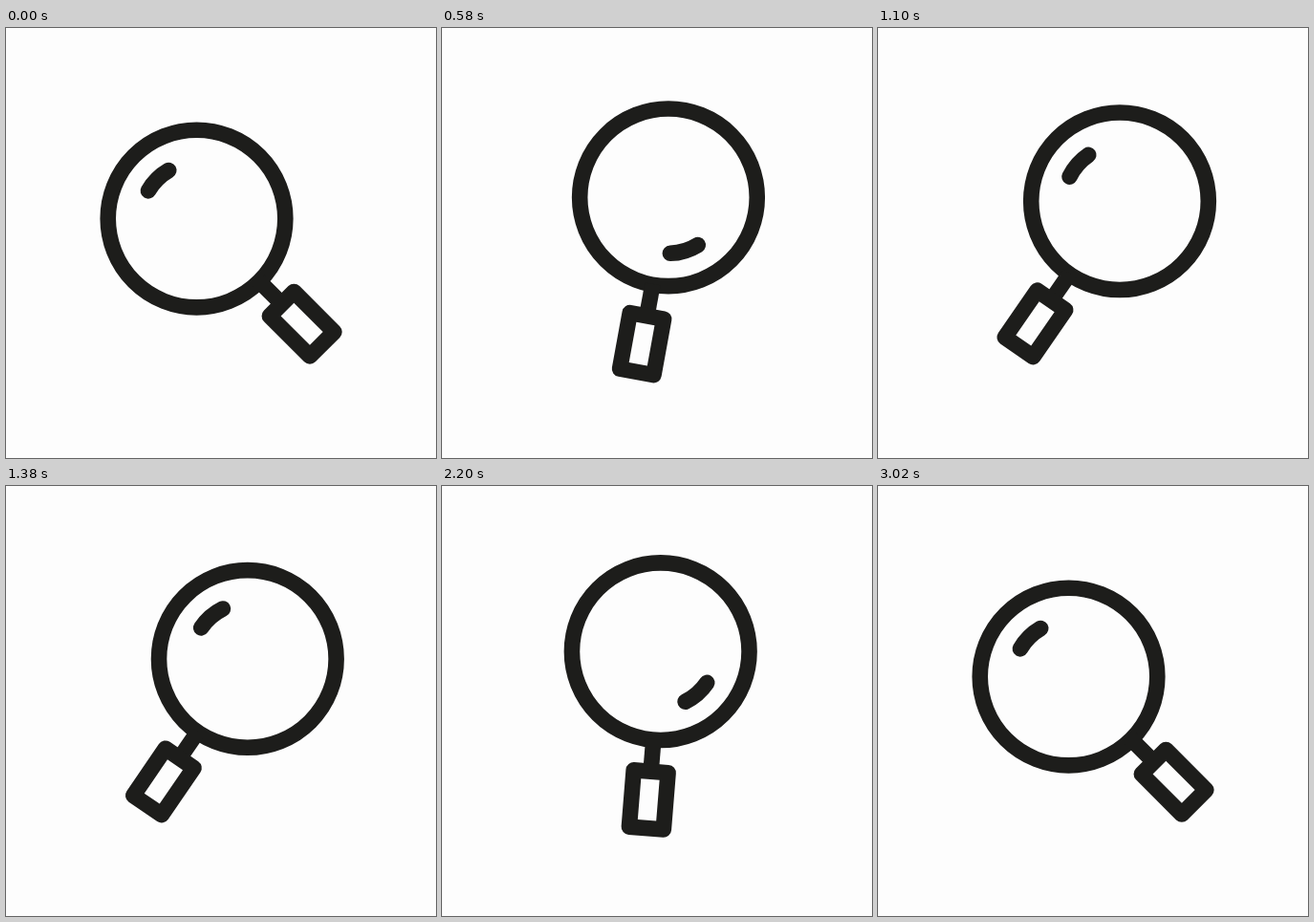
An HTML page for the animation above (3040 ms loop, 450 by 450 pixels).

```html
<!DOCTYPE html>
<html>
<head>
<meta charset="utf-8">
<style>
  html, body { margin: 0; width: 100%; height: 100%; overflow: hidden; background: #fdfdfd; }
  svg { display: block; width: 100%; height: 100%; }
</style>
</head>
<body>
<svg viewBox="0 0 450 450" fill="none" stroke="#1d1d1b" stroke-width="16.6" stroke-linejoin="round">
  <g id="glass">
    <circle r="92.8"/>
    <g id="handle">
      <path d="M92 0H126"/>
      <rect x="126" y="-18" width="59.5" height="36"/>
    </g>
    <path id="glint" d="M56.5 -15.1A58.5 58.5 0 0 1 56.5 15.1" stroke-linecap="round"/>
  </g>
</svg>
<script>
const LOOP = 3040, TURN = 1200, SWING = 80;
const [glass, handle, glint] = ['glass', 'handle', 'glint'].map(id => document.getElementById(id));

// cubic-bezier(a, 0, b, 1)
function ease(x, a, b) {
  let lo = 0, hi = 1;
  for (let i = 0; i < 30; i++) {
    const s = (lo + hi) / 2, r = 1 - s;
    if (3 * r * r * s * a + 3 * r * s * s * b + s ** 3 < x) lo = s; else hi = s;
  }
  return lo * lo * (3 - 2 * lo);
}

// Sideways drift that starts and ends at zero
const bow = (e, a, b) => 3 * (1 - e) * e * ((1 - e) * a + e * b);

function draw(t) {
  let swing, spin, dx, dy;
  if (t < TURN) {
    const x = t / TURN, e = ease(x, .476, .251);
    swing = SWING * e;
    spin = 360 * ease(x, .278, .545);
    dx = bow(e, 4.8, 3.2);
    dy = bow(e, 5.8, -5.1);
  } else {
    const x = (t - TURN) / (LOOP - TURN), e = ease(x, .672, .605);
    swing = SWING * (1 - e);
    spin = 360 + 360 * ease(x, .584, .52);
    dx = bow(e, 2, -8.8);
    dy = bow(e, -15.1, 3.2);
  }
  const a = (swing + 211.3) * Math.PI / 180;
  const cx = 237.2 + 44.1 * Math.cos(a) + dx;
  const cy = 222.5 + 44.1 * Math.sin(a) + dy;
  glass.setAttribute('transform', `translate(${cx} ${cy})`);
  handle.setAttribute('transform', `rotate(${45 + swing})`);
  glint.setAttribute('transform', `rotate(${225 + spin})`);
}

const start = performance.now();
function tick() {
  draw((performance.now() - start) % LOOP);
  requestAnimationFrame(tick);
}
tick();
</script>
</body>
</html>
```
